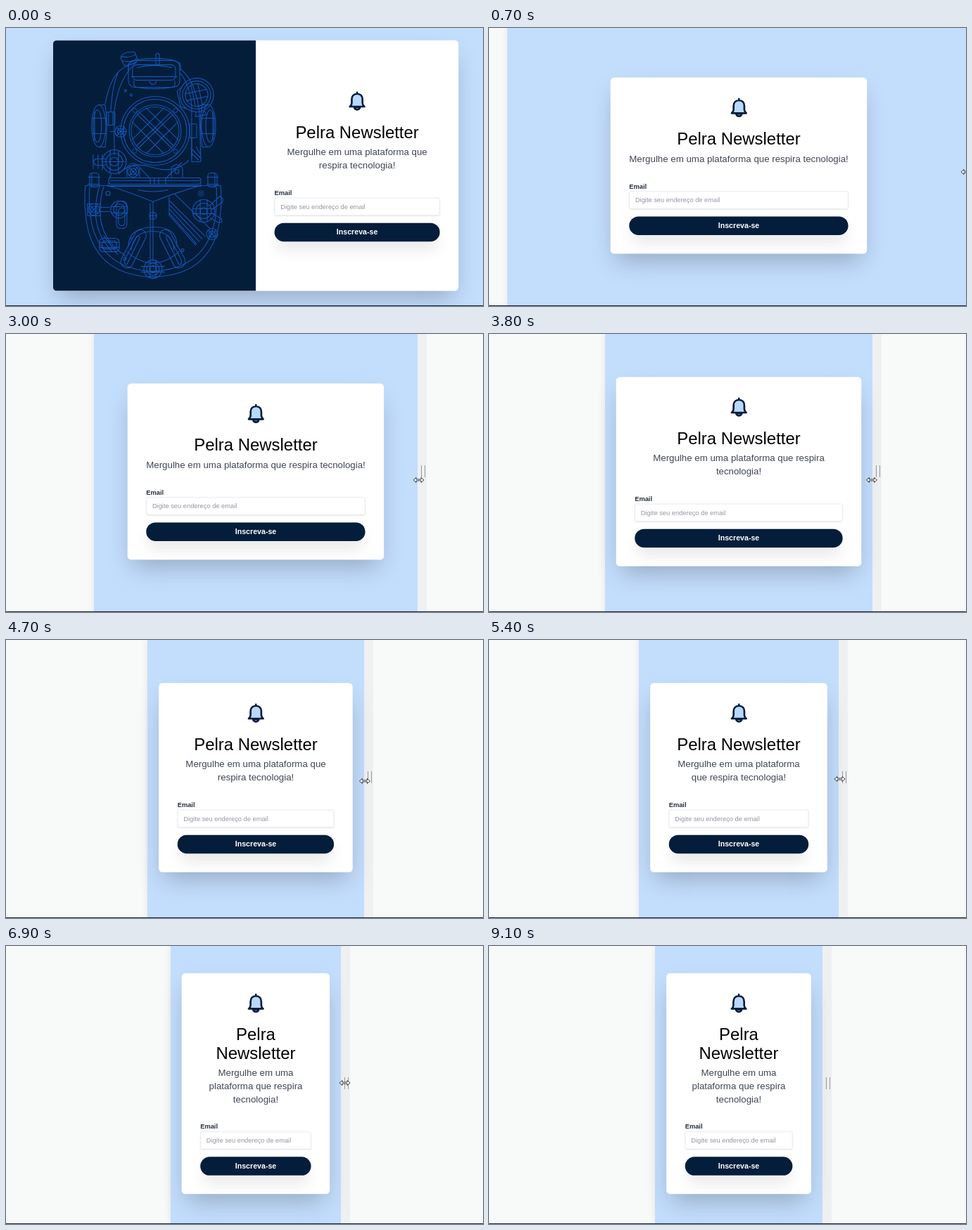
These frames come from a looping animation (678 by 396 pixels, 9.7 s). An HTML page:

```html
<!DOCTYPE html>
<html lang="pt">
<head>
<meta charset="utf-8">
<title>Newsletter</title>
<style>
* { box-sizing: border-box; margin: 0; }
html, body { width: 100%; height: 100%; overflow: hidden; background: #f8f9f9; }
body { position: relative; font-family: "Liberation Sans", Arial, sans-serif; }
#view { position: absolute; top: 0; height: 396px; background: #c3ddfd; box-shadow: 0 0 10px rgba(0,0,0,.09); }
#grip { position: absolute; top: 0; width: 13px; height: 396px; background: #eff0f2; }
#grip::after { content: ""; position: absolute; left: 5px; top: 187px; width: 4px; height: 17px; border: solid #999; border-width: 0 1px; }
#card {
  position: absolute; left: 354.8px; top: 195.5px; display: flex; align-items: center; width: max-content;
  transform: translate(-50%, -50%) scale(.664); border-radius: 8px; overflow: hidden;
  background: #fff; box-shadow: 0 25px 50px -12px rgba(0,0,0,.25);
}
#art { display: none; width: 434px; height: 538px; background: #041d3b; }
#form { padding: 40px; text-align: center; flex: 1; }
.wide #art { display: block; }
.wide #form { flex: none; width: 434px; }
.bell { display: block; width: 48px; height: 48px; margin: 0 auto; }
h1 { margin-top: 24px; font: 400 36px/40px "Liberation Sans", Arial, sans-serif; color: #000; }
p { margin-top: 8px; font-size: 20px; line-height: 28px; color: #3f4654; }
label { display: block; margin-top: 35px; text-align: left; font-weight: 700; font-size: 14px; line-height: 20px; color: #252f3f; }
.field {
  height: 38px; margin-top: 1px; padding: 0 12px; text-align: left; font-size: 14px; line-height: 36px; color: #9197a1;
  border: 1px solid #dfe3e9; border-radius: 4px; box-shadow: 0 1px 3px rgba(0,0,0,.13); white-space: nowrap;
}
.button {
  height: 40px; margin-top: 16px; border-radius: 20px; background: #041d3b; color: #fff; font-weight: 700; font-size: 16px;
  line-height: 40px; box-shadow: 0 20px 32px -4px rgba(0,0,0,.1);
}
#cursor { position: absolute; left: -8px; top: -5px; width: 16px; height: 10px; }
#base { position: absolute; left: 0; top: 395px; width: 100%; height: 1px; background: #1b2838; }
</style>
</head>
<body>
<div id="view"></div>
<div id="grip"></div>
<div id="card">
  <svg id="art" viewBox="67 17 288 357" preserveAspectRatio="none" fill="none" stroke="#1454b0" stroke-width="1.1">
    <defs>
      <g id="post"><rect x="119" y="206" width="13" height="20" rx="4"/><path d="M117 212h17M116 222h18M122 206v20"/></g>
      <g id="slot"><path d="M185 290l-21 38q-3 10 7 13 5 1 8-3l20-40q2-9-6-11-5-1-8 3z"/><path d="M186 297l-17 32q-2 7 3 7l18-37q1-5-4-2z"/></g>
      <g id="cross"><circle r="8"/><circle r="4.5"/><path d="M-6-6 6 6M-6 6 6-6"/></g>
    </defs>
    <!-- dome, hose and top window -->
    <path d="M163 42q4-10 20-8l4 10q-2 8-19 9zM165 46q12 4 21-3M163 40q12 3 22-3"/>
    <path d="M174 53Q150 60 141 108M186 48Q160 70 154 118V180M174 53l12-5M160 62Q151 80 149 120"/>
    <path d="M247 57Q270 75 275 120L277 190M248 64Q261 80 264 110V184"/>
    <rect x="174" y="46" width="73" height="38" rx="9"/>
    <rect x="180" y="52" width="61" height="22" rx="6"/>
    <path d="M174 60v-9q8-8 37-8t37 8v9M182 74v8q4 4 28 4t30-4v-8M186 56q24-6 50 0M178 69h66M204 73q0 7 5 7t5-7"/>
    <rect x="213" y="36" width="5" height="16" rx="2"/>
    <!-- upper right port -->
    <g transform="translate(271 95) rotate(-12)">
      <circle r="24"/><circle r="20"/><circle r="16"/>
      <path d="M-16-5h32M-16 5h32M-5-16v32M5-16v32M-19-15l-7 4v22l7 5M-6 24l-2 6h16l-2-6"/>
    </g>
    <!-- front window -->
    <circle cx="212" cy="146" r="49"/><circle cx="212" cy="146" r="45"/><circle cx="212" cy="146" r="37"/><circle cx="212" cy="146" r="34"/>
    <path d="M186 122l50 49M189 119l50 49M199 113l46 46M179 133l45 45M238 122l-50 49M235 119l-50 49M225 113l-46 46M245 133l-45 45"/>
    <g stroke-width=".9"><circle cx="183" cy="117" r="3"/><circle cx="241" cy="117" r="3"/><circle cx="183" cy="175" r="3"/><circle cx="241" cy="175" r="3"/></g>
    <use href="#cross" x="163" y="147"/>
    <path d="M154 147h-6M172 147h-8M168 87l4 4m0-4-4 4"/><circle cx="178" cy="95" r="1.5"/>
    <rect x="143" y="119" width="12" height="19" rx="3"/><path d="M146 119v19M152 119v19"/>
    <!-- side ports -->
    <ellipse cx="132" cy="139" rx="10" ry="30"/><ellipse cx="130" cy="139" rx="6" ry="23"/><path d="M132 109h9q5 30 0 60h-9M122 128h21M122 150h21M126 119v40"/>
    <ellipse cx="288" cy="139" rx="10" ry="30"/><ellipse cx="290" cy="139" rx="6" ry="23"/><path d="M288 109h-9q-5 30 0 60h9M277 128h21M277 150h21M294 119v40"/>
    <rect x="261" y="136" width="10" height="20" rx="2"/><path d="M264 172l13 13M264 178l10 10M270 168l7 12M264 156v34h13"/>
    <!-- lower valves and neck ring -->
    <circle cx="154" cy="190" r="17"/><circle cx="154" cy="190" r="12"/><circle cx="154" cy="190" r="6"/>
    <path d="M142 186h-14q-7 4 0 9h14M137 179v23M124 180v20M131 180v20M148 174v32M160 174v32M138 190h32"/>
    <use href="#cross" x="181" y="204"/><path d="M172 212V198q8-11 18 0v14M235 212v-13q7-10 16 0v13"/><circle cx="243" cy="204" r="3"/>
    <path d="M160 208Q176 188 208 198T260 188M150 207Q148 212 147 214M190 198l14 15M228 213l22-22"/>
    <rect x="146" y="213" width="131" height="9" rx="3"/><path d="M148 217h128M145 222v3h132v-3M205 213v9M211 213v9M217 213v9M227 213v9"/>
    <!-- breastplate -->
    <use href="#post"/><use href="#post" transform="translate(419 0) scale(-1 1)"/>
    <path d="M113 224H305Q308 258 301 288 284 352 209 354 134 352 117 288 110 258 113 224zM119 226Q117 262 124 286 142 343 209 346 276 343 294 286 301 262 299 226"/>
    <path d="M139 225Q120 292 170 324M133 225Q116 282 151 318M145 224Q178 234 209 247 240 234 277 224M209 247v84M205 249v82M187 230Q209 235 231 230"/>
    <path d="M232 245l51 51M232 251l47 49M232 257l43 47M232 263l39 44M232 240v26l38 43M240 236l50 49"/>
    <circle cx="209" cy="267" r="5"/><path d="M204 267h10M209 262v10"/>
    <g transform="translate(277 235) scale(.5)"><use href="#cross"/></g>
    <circle cx="145" cy="235" r="3"/>
    <use href="#cross" x="125" y="258"/><path d="M116 250h18v17h-18zM134 255h14M134 261h14"/>
    <circle cx="161" cy="258" r="12"/><circle cx="161" cy="258" r="8"/><rect x="157" y="246" width="15" height="39" rx="6"/><rect x="160" y="256" width="9" height="25" rx="4"/><path d="M149 254h24M149 263h24"/>
    <circle cx="281" cy="260" r="16"/><circle cx="281" cy="260" r="11"/><circle cx="281" cy="260" r="5"/>
    <path d="M290 252l14-13q7 4 3 9l-14 10M292 263l14 8q3 7-5 5l-11-6M276 244v32M286 244v32M265 257h32M265 264h32"/>
    <use href="#cross" x="293" y="293"/>
    <rect x="133" y="299" width="28" height="19" rx="5"/><rect x="137" y="303" width="20" height="11" rx="3"/><path d="M133 305h28M133 312h28M139 295l20 27"/>
    <path d="M174 311Q174 284 209 283T243 311M178 316Q181 289 209 289T239 316M172 318Q190 334 209 334T246 318"/>
    <use href="#slot"/><use href="#slot" transform="translate(418 0) scale(-1 1)"/>
    <circle cx="209" cy="343" r="13"/><circle cx="209" cy="343" r="9"/><circle cx="209" cy="343" r="5"/><path d="M192 339h34M192 347h34M205 330v26M213 330v26"/>
    <circle cx="178" cy="299" r="1.5"/><circle cx="251" cy="316" r="2"/><circle cx="169" cy="328" r="2"/>
  </svg>
  <div id="form">
    <svg class="bell" viewBox="0 0 48 48" fill="#b9d8fc" stroke="#041d3b" stroke-width="4" stroke-linecap="round" stroke-linejoin="round">
      <path d="M18 38a6 5 0 0 0 12 0z"/>
      <path d="M24 6v3M24 9C17 9 12.500 14 12.500 21v8q0 4-4 7.500h31q-4-3.500-4-7.500v-8C35.500 14 31 9 24 9z"/>
    </svg>
    <h1>Pelra Newsletter</h1>
    <p>Mergulhe em uma plataforma que respira tecnologia!</p>
    <label>Email</label>
    <div class="field">Digite seu endereço de email</div>
    <div class="button">Inscreva-se</div>
  </div>
</div>
<svg id="cursor" viewBox="-8 -5 16 10"><path d="M-7.500 0l4-3.500v2.500h7v-2.500l4 3.500-4 3.500v-2.500h-7v2.500z" fill="#fff" stroke="#222" stroke-width=".9"/></svg>
<div id="base"></div>
<script>
const LOOP = 9700, STEP = 100, SCALE = .664, CENTRE = 354.8;
const $ = id => document.getElementById(id);
const [view, grip, card, cursor] = ["view", "grip", "card", "cursor"].map($);

// time, left edge of the viewport, cursor x, cursor y
const keys = [
  [0, -20, 722, 205], [700, 26, 678.5, 205], [1000, 47, 664, 205], [1700, 47, 664, 205],
  [2500, 107, 606, 207], [2700, 107, 606, 207], [3000, 125, 586.5, 208], [3700, 160, 549, 208],
  [3800, 164.5, 544, 208], [3900, 173, 537, 207], [4000, 173, 537, 207], [4800, 205, 506, 200],
  [4900, 205, 506, 200], [5400, 213, 498.5, 198], [5900, 227, 486, 197], [6300, 230, 484, 196],
  [6400, 230, 484, 196], [6900, 233.5, 481.5, 195], [7300, 236, 480, 195], [LOOP, 236, 480, 195]
];

function pose(t) {
  const i = keys.findIndex(k => k[0] > t);
  const a = keys[i - 1], b = keys[i], f = (t - a[0]) / (b[0] - a[0]);
  return a.map((v, j) => v + (b[j] - v) * f);
}

function draw(now) {
  const t = Math.floor(now % LOOP / STEP) * STEP;
  const [, left, x, y] = pose(t);
  const width = 2 * (CENTRE - left), wide = left < 15;
  view.style.left = left + "px";
  view.style.width = width + "px";
  grip.style.left = left + width + "px";
  card.className = wide ? "wide" : "";
  card.style.maxWidth = wide ? "none" : width / SCALE - 48 + "px";
  cursor.style.transform = `translate(${x}px, ${y}px)`;
  cursor.style.display = t < 8300 ? "" : "none";
  requestAnimationFrame(draw);
}
draw(0);
</script>
</body>
</html>
```
